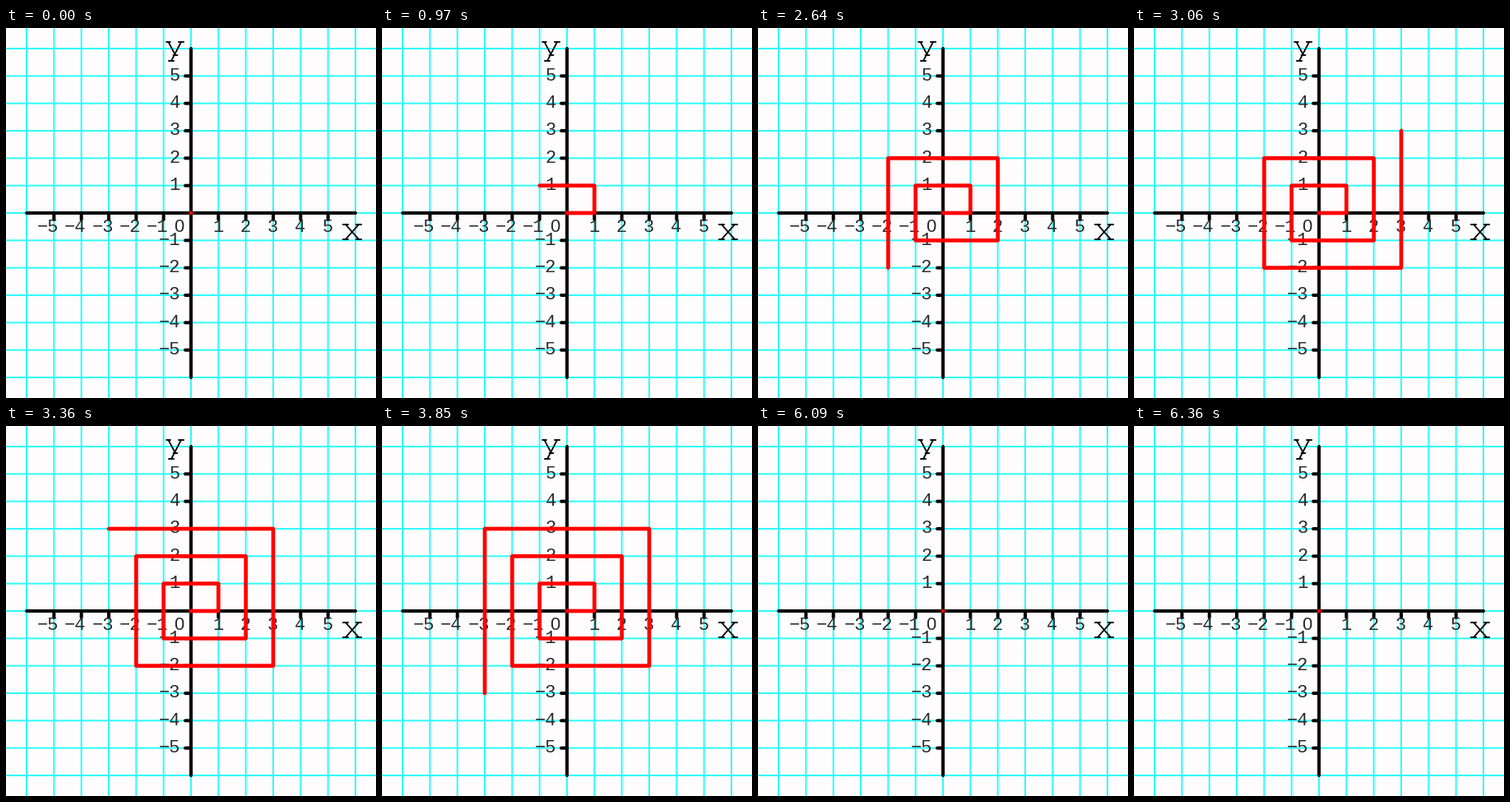
A matplotlib script for the animation above (6.39 s loop, 450 px wide and 450 px high).

```python
import matplotlib.pyplot as plt
from matplotlib.animation import FuncAnimation

SIZE, DPI = 450, 100
PX = 72 / DPI
CENTER, UNIT, REACH = 225, 100 / 3, 6
STEP_MS, LOOP_MS, RESET_MS = 30, 6390, 6090
SIDES, SIDE_MS, LEAD_MS = 13, 306, 42
CYAN, RED = "#2ffbfb", "#ff0000"

fig = plt.figure(figsize=(SIZE / DPI, SIZE / DPI), dpi=DPI, facecolor="#fefcfd")
ax = fig.add_axes([0, 0, 1, 1])
ax.set_xlim(0, SIZE)
ax.set_ylim(SIZE, 0)
ax.axis("off")


def stroke(xs, ys, width, color="black", zorder=2):
    line, = ax.plot(xs, ys, color=color, lw=width * PX, zorder=zorder, snap=False,
                    solid_capstyle="round", solid_joinstyle="round")
    return line


def slab_stroke(x0, y0, x1, y1, slab=3.2):
    """A thin letter stroke with a flat slab at both ends."""
    stroke([x0, x1], [y0, y1], 1.8, zorder=3)
    for x, y in ((x0, y0), (x1, y1)):
        stroke([x - slab, x + slab], [y, y], 1.8, zorder=3)


def number(n, right, y, family="Liberation Mono"):
    ax.text(right, y, str(n).replace("-", "\u2212"), family=family, size=22 * PX,
            color="#2a2a2a", ha="right", va="center", zorder=3)


def to_stage(x, y):
    return CENTER + x * UNIT, CENTER - y * UNIT


def spiral(sides):
    """Corners of a square spiral with side lengths 1, 1, 2, 2, 3, 3 ..."""
    position, direction = 0, 1
    corners = [position]
    for i in range(sides):
        position += direction * (i // 2 + 1)
        direction *= 1j
        corners.append(position)
    return [to_stage(complex(c).real, complex(c).imag) for c in corners]


low, high = CENTER - REACH * UNIT, CENTER + REACH * UNIT
stroke([low, high], [CENTER, CENTER], 4)
stroke([CENTER, CENTER], [low, high], 4)

for k in range(-REACH, REACH + 1):
    x, y = to_stage(k, k)
    stroke([x, x], [-5, SIZE + 5], 2, CYAN, 1)
    stroke([-5, SIZE + 5], [y, y], 2, CYAN, 1)
    if 0 < abs(k) < REACH:
        stroke([x, x], [CENTER, 233], 4)
        stroke([218, CENTER], [y, y], 4)
        number(k, x + 6, 243)
        number(k, 212, y)

# The mono font dots its zero, the sans one does not
number(0, 216, 243, "Liberation Sans")
slab_stroke(413, 239, 429, 257)
slab_stroke(429, 239, 413, 257)
slab_stroke(197.5, 17, 206, 33, slab=2.5)
slab_stroke(213, 17, 201, 40)
ax.add_patch(plt.Circle((CENTER, CENTER), 2.5, color=RED, lw=0, zorder=4))

PATH_X, PATH_Y = zip(*spiral(SIDES))
tip_x, tip_y = PATH_X[-1], PATH_Y[-1]
trail = stroke([], [], 4.7, RED, 5)
head = stroke([tip_x - 12, tip_x, tip_x - 12], [tip_y - 12, tip_y, tip_y + 12],
              4.7, RED, 5)


def update(frame):
    t = frame * STEP_MS
    sides = 0 if t >= RESET_MS else min(SIDES, (t + LEAD_MS) // SIDE_MS)
    corners = sides + 1 if sides else 0
    trail.set_data(PATH_X[:corners], PATH_Y[:corners])
    head.set_visible(sides == SIDES)
    return trail, head


anim = FuncAnimation(fig, update, frames=LOOP_MS // STEP_MS, interval=STEP_MS,
                     repeat=True, repeat_delay=0, blit=True)
plt.show()
```
